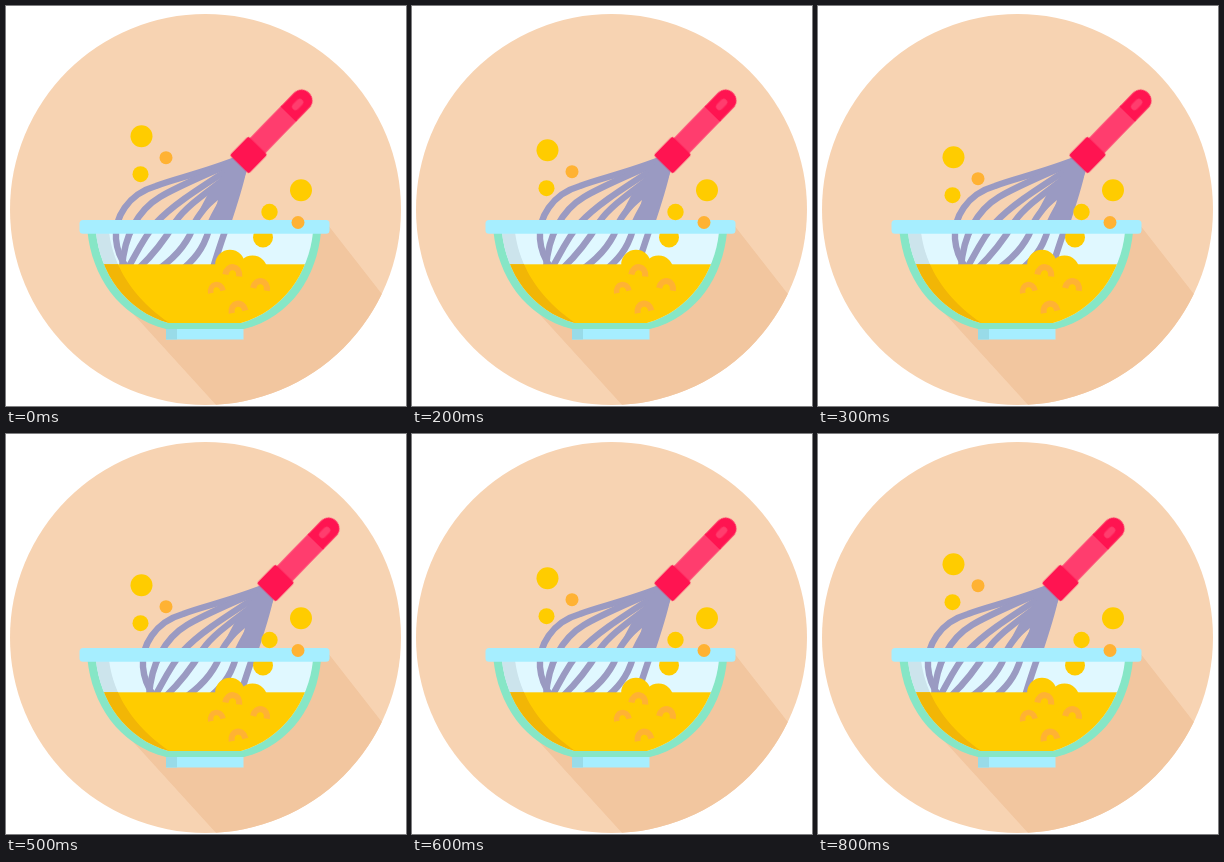
Write an HTML page without scripts that moves like this. It is 400 px wide and 400 px high and loops after 1800 ms.

```html
<!DOCTYPE html>
<html lang="en">
<head>
<meta charset="utf-8">
<title>Whisking eggs</title>
<style>
  html, body { margin: 0; width: 100%; height: 100%; overflow: hidden; background: #fff; }
  svg { display: block; width: 100%; height: 100%; }
  .whisk { --to: 36px, 0px; }
  .drops { --to: 0px, 28px; }
  .whisk, .drops { animation: stir 1.8s infinite; }
  /* four hard steps out, four back, then rest */
  @keyframes stir {
    0% { transform: translate(0px, 0px); animation-timing-function: steps(4, end); }
    22.2222% { transform: translate(var(--to)); animation-timing-function: steps(4, end); }
    44.4444%, 100% { transform: translate(0px, 0px); }
  }
  .yolk { fill: #ffcc00; }
  .amber { fill: #ffb233; }
  .glass { fill: #a6eeff; }
  .red { fill: #ff1451; }
  .pink { fill: #ff3d6e; }
  .wires { fill: none; stroke: #9a9ac2; stroke-width: 6.4; }
  .fan { fill: #9a9ac2; }
  .curls { fill: none; stroke: #ffb233; stroke-width: 6.2; }
</style>
</head>
<body>
<svg viewBox="0 0 400 400">
  <defs>
    <clipPath id="disc"><circle cx="199.5" cy="203.5" r="195.5"/></clipPath>
    <path id="inner" d="M90 226C94 267 120 305 163 317H235C277 305 303 267 307 226Z"/>
    <clipPath id="inside"><use href="#inner"/></clipPath>
    <clipPath id="liquid"><rect y="258.300" width="400" height="70"/></clipPath>
    <path id="shade" d="M80 226H103C106 250 119 289 168 320H80Z"/>
    <path id="curl" d="M-7 5C-6.500-6 6.500-6 7 5"/>
  </defs>

  <g clip-path="url(#disc)">
    <rect width="400" height="400" fill="#f7d3b2"/>
    <path d="M322 219L400 319V400H211L100 278Z" fill="#f2c69f"/>
  </g>

  <path class="glass" d="M160 320H237.500V333.500H160Z"/>
  <path d="M160 320H171V333.500H160Z" fill="#98dbe8"/>
  <path d="M81.500 226C86 269 112 311 160 323H238C286 311 311 269 315 226Z" fill="#86e6c6"/>
  <use href="#inner" fill="#e0f8ff"/>
  <g clip-path="url(#inside)"><use href="#shade" fill="#cce4ec"/></g>

  <g class="whisk">
    <g class="wires">
      <path d="M232 153C200 166 168 173 150 180C122 188 108 212 110 233C111 246 115 254 121 262"/>
      <path d="M232 154C205 167 174 179 154 191C132 204 118 230 116 262"/>
      <path d="M234 156C202 177 168 197 150 217C138 231 130 248 122 262"/>
      <path d="M236 158C215 178 184 195 170 215C161 230 148 248 133 262"/>
      <path d="M237 159C222 180 200 196 189 216C183 236 171 250 154 262"/>
      <path d="M238 160C228 180 214 195 205 216C200 238 192 250 178 262"/>
      <path d="M238 161C231 195 218 225 207 262"/>
    </g>
    <path class="fan" d="M228 154L241 164L222 218H205L212 194L187 216L202 188Z"/>
    <g transform="translate(242.500 149) rotate(-45.800)">
      <rect class="pink" x="10" y="-10.800" width="49" height="21.600"/>
      <path class="red" d="M57-10.800H76A10.800 10.800 0 0 1 76 10.800H57Z"/>
      <rect class="pink" x="64" y="-3.500" width="13" height="7" rx="3.500"/>
      <rect class="red" x="-13.300" y="-13.300" width="26.600" height="26.600" rx="2"/>
    </g>
  </g>

  <g clip-path="url(#inside)">
    <rect class="yolk" x="80" y="258.300" width="240" height="62"/>
    <g clip-path="url(#liquid)"><use href="#shade" fill="#f2b606"/></g>
    <circle class="yolk" cx="224" cy="258.500" r="14.800"/>
    <circle class="yolk" cx="246.500" cy="264.500" r="15"/>
  </g>
  <g class="curls">
    <use href="#curl" transform="translate(227 264.500) rotate(8)"/>
    <use href="#curl" transform="translate(210 281.500) rotate(-12) scale(.9)"/>
    <use href="#curl" transform="translate(255 278.500) rotate(12)"/>
    <use href="#curl" transform="translate(231.500 301) rotate(-12)"/>
  </g>

  <circle class="yolk" cx="257" cy="231.500" r="10"/>
  <rect class="glass" x="73.500" y="214" width="250" height="13.700" rx="3.500"/>

  <circle class="yolk" cx="295" cy="184.200" r="11"/>
  <circle class="yolk" cx="263.500" cy="206" r="8.200"/>
  <circle class="amber" cx="292" cy="216.500" r="6.500"/>
  <g class="drops">
    <circle class="yolk" cx="135.500" cy="130.200" r="11"/>
    <circle class="yolk" cx="134.500" cy="168.200" r="8"/>
    <circle class="amber" cx="160" cy="151.700" r="6.500"/>
  </g>
</svg>
</body>
</html>
```
